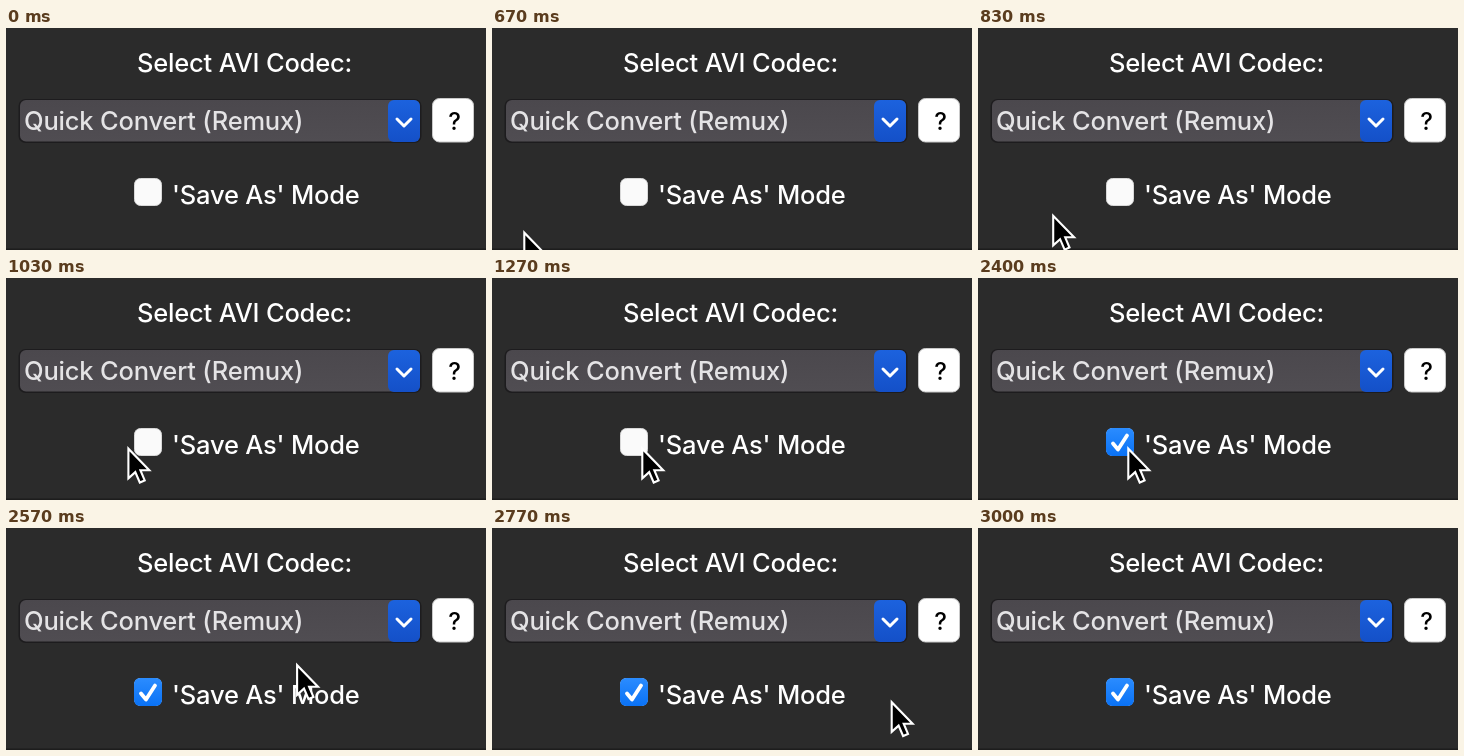
These frames come from a looping animation (480 by 222 pixels, 3.33 s). An HTML page:

```html
<!DOCTYPE html>
<html lang="en">
<head>
<meta charset="utf-8">
<title>Save As mode</title>
<style>
  html, body { margin: 0; width: 100%; height: 100%; overflow: hidden; background: #2b2b2b; }
  svg { display: block; width: 100vw; height: 100vh; }
  text { font: 500 25.5px Inter, "Open Sans", sans-serif; letter-spacing: -.2px; fill: #fff; }
  .line { fill: none; stroke: #fff; stroke-linecap: round; stroke-linejoin: round; }
</style>
</head>
<body>
<svg viewBox="0 0 480 222">
  <defs>
    <linearGradient id="field" x2="0" y2="1">
      <stop stop-color="#4b484d"/><stop offset="1" stop-color="#504d52"/>
    </linearGradient>
    <linearGradient id="blue" x2="0" y2="1">
      <stop stop-color="#1c62de"/><stop offset="1" stop-color="#1450c8"/>
    </linearGradient>
    <linearGradient id="checkBlue" x2="0" y2="1">
      <stop stop-color="#2b8cff"/><stop offset="1" stop-color="#0a72f5"/>
    </linearGradient>
  </defs>
  <rect width="480" height="222" fill="#2b2b2b"/>
  <rect y="220.5" width="480" height="1.5" fill="#1d1d1d"/>

  <text x="238.5" y="44" text-anchor="middle">Select AVI Codec:</text>

  <rect x="12.5" y="71" width="403" height="44" rx="7" fill="#1d1c1e"/>
  <rect x="14" y="72" width="400" height="41.5" rx="6" fill="url(#field)"/>
  <rect x="382" y="72" width="32" height="42" rx="6" fill="url(#blue)"/>
  <path class="line" d="M391 91l7 7 7-7" stroke-width="3"/>
  <text x="18" y="102" style="fill:#e4e3e5">Quick Convert (Remux)</text>

  <rect x="426.5" y="70.5" width="41" height="43.5" rx="7" fill="#fff" stroke="#c9c9c9"/>
  <text x="448.5" y="102" text-anchor="middle" style="fill:#000;font-size:24px">?</text>

  <rect x="128.5" y="150.5" width="27" height="27" rx="6" fill="#fafafa" stroke="#d8d8d8"/>
  <g id="check">
    <rect x="128" y="150" width="28" height="28" rx="6" fill="url(#checkBlue)"/>
    <path class="line" d="M135 165.5l5 6 9-14" stroke-width="3.8"/>
  </g>
  <text x="166" y="176">'Save As' Mode</text>

  <path id="cursor" d="M1.3 2.2V31.8L8.2 25.6L12.7 36L17.6 33.9L13.3 23.7H22.2Z"
        fill="#000" stroke="#fff" stroke-width="2.1"/>
</svg>
<script>
  const LOOP = 3330, STEP = 100 / 3;
  const check = document.getElementById('check');
  const cursor = document.getElementById('cursor');

  // Pointer keys: [ms, x, y]
  const arrive = [[667, 31, 202.5], [1033, 121, 168.5], [1267, 149, 168.5], [2400, 149, 168.5]];
  const leave = [[2400, 149, 168.5], [2567, 290, 135], [2900, 462, 205], [2967, 482, 224]];

  const slope = (a, b, axis) => (b[axis] - a[axis]) / (b[0] - a[0]);

  // Hermite curve through unevenly timed keys
  function along(keys, t, axis) {
    const last = keys.length - 1;
    let i = 0;
    while (i < last - 1 && t >= keys[i + 1][0]) i++;
    const a = keys[i], b = keys[i + 1], span = b[0] - a[0];
    const tangent = k => {
      if (k === 0) return keys === leave ? 0 : slope(keys[0], keys[1], axis);
      if (k === last) return slope(a, b, axis);
      if (keys === arrive && k === 2) return 0;
      return slope(keys[k - 1], keys[k + 1], axis);
    };
    const u = Math.min(1, Math.max(0, (t - a[0]) / span)), v = 1 - u;
    return (1 + 2 * u) * v * v * a[axis] + u * v * v * span * tangent(i)
      + u * u * (3 - 2 * u) * b[axis] - u * u * v * span * tangent(i + 1);
  }

  function draw(now) {
    const t = Math.floor((now % LOOP) / STEP + 0.12) * STEP;
    const keys = t < 2400 ? arrive : leave;
    const x = along(keys, t, 1), y = along(keys, t, 2);
    cursor.setAttribute('transform', `translate(${x.toFixed(1)} ${y.toFixed(1)})`);
    cursor.style.display = t > 660 && t < 2990 ? '' : 'none';
    check.style.opacity = Math.min(1, Math.max(0, (t - 1380) / 90));
    requestAnimationFrame(draw);
  }
  draw(performance.now());
</script>
</body>
</html>
```
